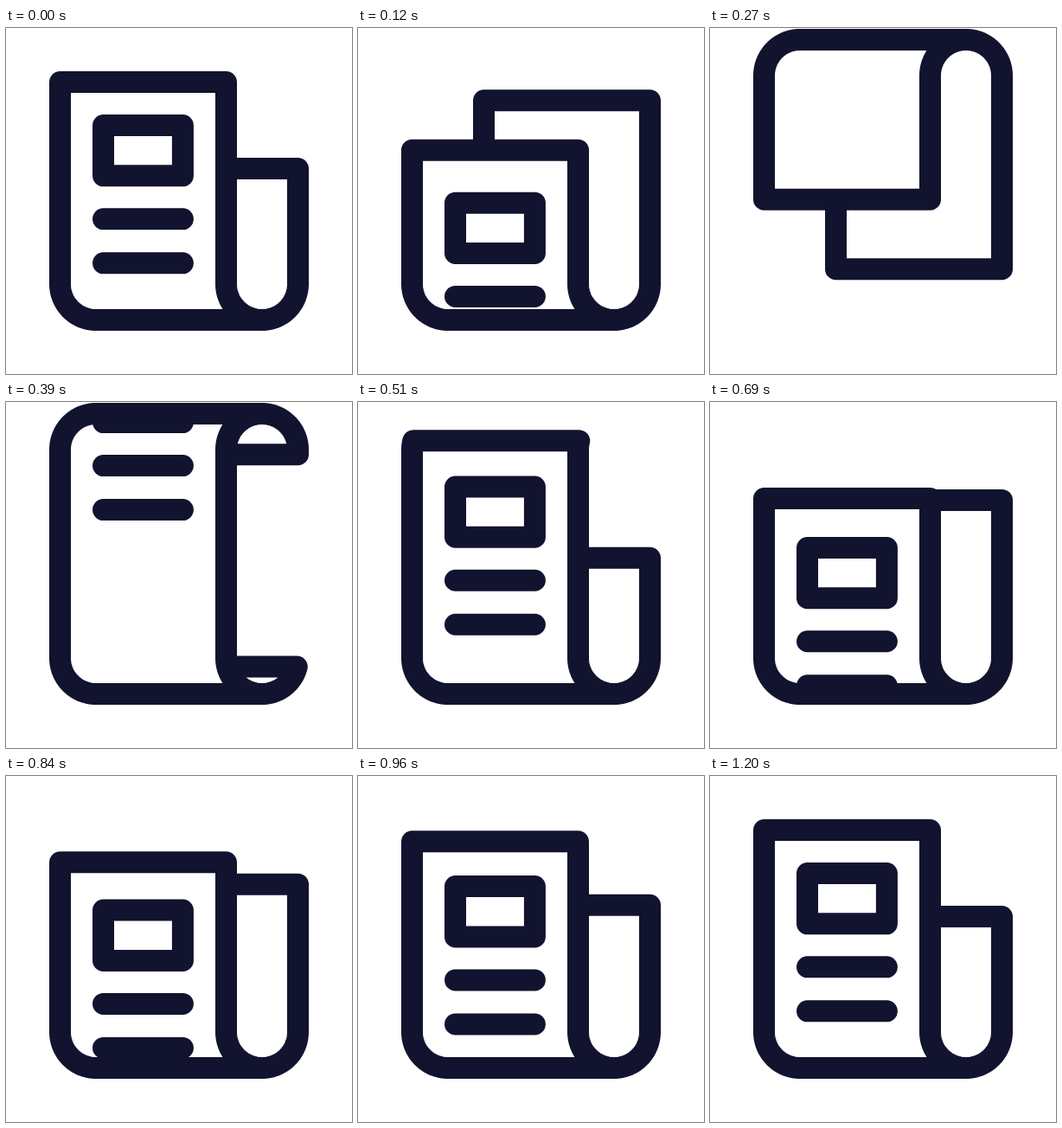
Recreate the animation shown at these times as an HTML page with a canvas. Size 400 by 400 pixels, loop 3.23 s.

```html
<!DOCTYPE html>
<html lang="en">
<head>
<meta charset="utf-8">
<title>Rolling newspaper</title>
<style>
  html, body { margin: 0; width: 100%; height: 100%; overflow: hidden; background: #fff; }
  canvas { display: block; width: 400px; height: 400px; }
</style>
</head>
<body>
<canvas id="stage"></canvas>
<script>
const canvas = document.getElementById('stage');
const ctx = canvas.getContext('2d');
const dpr = window.devicePixelRatio || 1;
canvas.width = canvas.height = 400 * dpr;
ctx.scale(dpr, dpr);

const INK = '#12132f';
const LOOP = 3230, STEP = 30, PEAK_AT = 720, END_AT = 1200;

// The sheet runs round a stadium-shaped track: front lane, bottom fold, back lane, top fold.
const R = 41.5, TOP = 55, BOTTOM = 296, CENTER = 104, WIDTH = 192;
const LANE = BOTTOM - TOP, ARC = Math.PI * R, LAP = 2 * (LANE + ARC);
const HALF = LAP / 2;
const TAIL = 62.5 - TOP;
const HEAD = LANE + ARC + BOTTOM - 162.5;
const PEAK = LAP + 50.2;

function trackPoint(s) {
  s = ((s % LAP) + LAP) % LAP;
  if (s < LANE) return [CENTER - R, TOP + s];
  s -= LANE;
  if (s < ARC) return [CENTER - R * Math.cos(s / R), BOTTOM + R * Math.sin(s / R)];
  s -= ARC;
  if (s < LANE) return [CENTER + R, BOTTOM - s];
  s -= LANE;
  return [CENTER + R * Math.cos(s / R), TOP - R * Math.sin(s / R)];
}

// Eased value of cubic-bezier(x1, 0, x2, 1)
function ease(u, x1, x2) {
  if (u <= 0) return 0;
  if (u >= 1) return 1;
  let lo = 0, hi = 1;
  for (let i = 0; i < 30; i++) {
    const p = (lo + hi) / 2, q = 1 - p;
    if (3 * q * q * p * x1 + 3 * q * p * p * x2 + p * p * p < u) lo = p;
    else hi = p;
  }
  return lo * lo * (3 - 2 * lo);
}

function travel(t) {
  if (t < PEAK_AT) return PEAK * ease(t / PEAK_AT, 0.333, 0.36);
  return PEAK + (LAP - PEAK) * ease((t - PEAK_AT) / (END_AT - PEAK_AT), 0.333, 0.3);
}

function printOffset(t, d) {
  if (t >= PEAK_AT) return 1.14 * (d - LAP);
  return d < 400 ? 1.14 * d : 57.2 - 1.055 * (PEAK - d);
}

function strip(from, to) {
  const n = Math.max(2, Math.ceil((to - from) / 2));
  const edge = [];
  for (let i = 0; i <= n; i++) edge.push(trackPoint(from + (to - from) * i / n));
  ctx.beginPath();
  for (const [x, y] of edge) ctx.lineTo(x, y);
  for (const [x, y] of edge.reverse()) ctx.lineTo(x + WIDTH, y);
  ctx.closePath();
  ctx.fill();
  ctx.stroke();
}

// Draws the parts of the sheet that lie on one side of the track.
function side(start, tail, head) {
  for (let lap = 0; lap < 3; lap++) {
    const a = start + lap * LAP;
    const from = Math.max(tail, a), to = Math.min(head, a + HALF);
    if (to > from) strip(from, to);
  }
}

function print(dy) {
  ctx.save();
  ctx.beginPath();
  ctx.rect(50, TOP - R, 217, LANE + 2 * R);
  ctx.clip();
  ctx.translate(0, dy);
  ctx.strokeRect(112.5, 112.5, 91.9, 58.3);
  ctx.beginPath();
  for (const y of [220.8, 271.8]) {
    ctx.moveTo(112.5, y);
    ctx.lineTo(204.4, y);
  }
  ctx.stroke();
  ctx.restore();
}

function draw(t) {
  const d = travel(t);
  const front = -ARC / 2;
  ctx.fillStyle = '#fff';
  ctx.fillRect(0, 0, 400, 400);
  ctx.strokeStyle = INK;
  ctx.lineWidth = 25;
  ctx.lineJoin = ctx.lineCap = 'round';
  side(front - HALF, TAIL + d, HEAD + d);
  side(front, TAIL + d, HEAD + d);
  print(printOffset(t, d));
}

const began = performance.now();
function tick() {
  const t = (performance.now() - began) % LOOP;
  draw(Math.min(END_AT, Math.floor(t / STEP) * STEP));
  requestAnimationFrame(tick);
}
tick();
</script>
</body>
</html>
```
